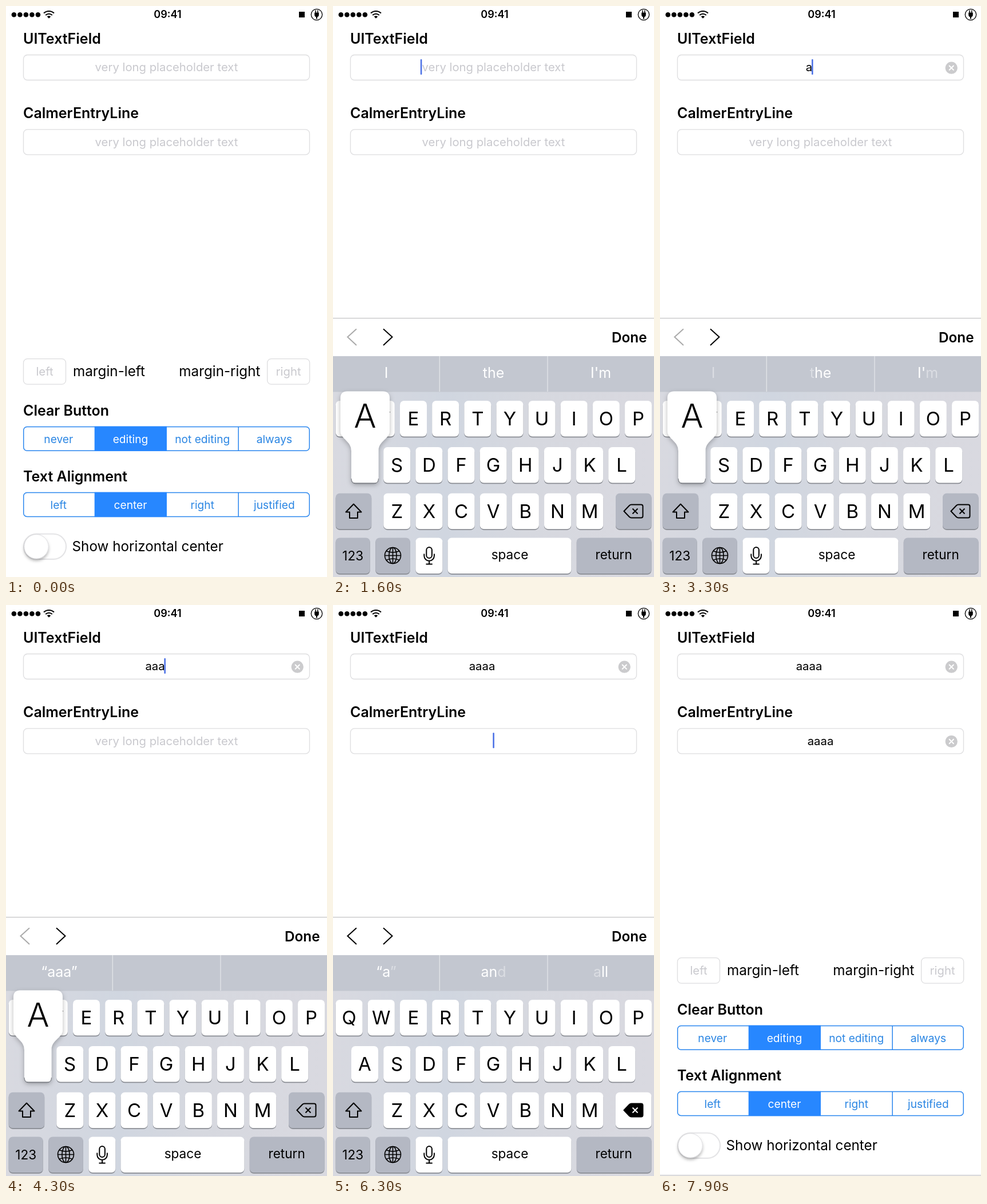
These frames come from a looping animation (561x998 px, 8 s). An HTML page:

```html
<!DOCTYPE html>
<html lang="en">
<head>
<meta charset="utf-8">
<title>Text field demo</title>
<style>
  html, body { margin: 0; width: 100%; height: 100%; overflow: hidden; background: #fff; }
  svg { display: block; width: 100%; height: 100%; font-family: Inter, Roboto, sans-serif; }
  text { white-space: pre; }
  .head { font-size: 25px; font-weight: 600; }
  .label { font-size: 24.25px; }
  .field { font-size: 20.3px; }
  .hint { fill: #c9c9ce; }
  .seg { font-size: 19.2px; fill: #2b86e3; }
  .on { fill: #fff; }
  .letter { font-size: 33px; }
  .word { font-size: 22.6px; }
  .suggest { font-size: 25px; fill: #fff; }
  .mid { text-anchor: middle; }
  .box { fill: #fff; stroke: #dddddf; stroke-width: 1.3; }
  .line { fill: none; stroke: #000; stroke-width: 2; }
</style>
</head>
<body>
<svg viewBox="0 0 561 998">
  <defs>
    <linearGradient id="tray">
      <stop offset="0" stop-color="#d8d9e0"/>
      <stop offset=".35" stop-color="#d0d6e0"/>
      <stop offset=".6" stop-color="#d6d8df"/>
      <stop offset="1" stop-color="#d9d9e0"/>
    </linearGradient>
    <filter id="soft" x="-40%" y="-40%" width="180%" height="180%">
      <feDropShadow dx="0" dy="3" stdDeviation="4" flood-opacity=".28"/>
    </filter>
    <filter id="lift" x="-40%" y="-40%" width="180%" height="180%">
      <feDropShadow dx="0" dy="3.5" stdDeviation="2.5" flood-opacity=".28"/>
    </filter>
    <g id="clear">
      <circle r="10.6" fill="#cbcbcd"/>
      <path d="M-4.2-4.2 4.2 4.2M4.2-4.2-4.2 4.2" stroke="#fff" stroke-width="2"/>
    </g>
  </defs>
  <rect width="561" height="998" fill="#fff"/>

  <g id="status">
    <path d="M66 12.5a13 13 0 0 1 18 0M69.2 16a8.3 8.3 0 0 1 11.6 0" class="line"/>
    <path d="M75 21.8 71.8 18.6a4.6 4.6 0 0 1 6.4 0z"/>
    <text x="282.5" y="21.4" class="mid" font-size="18.1" font-weight="600">09:41</text>
    <rect x="512" y="10" width="10" height="10"/>
    <circle cx="543" cy="15" r="9.7" class="line" style="stroke-width:1.3"/>
    <path d="M539.2 11.5h7.600v4q0 3-2.800 3.800v3.200h-2v-3.200q-2.800-.8-2.800-3.800zM540.500 7.500h1.500v5h-1.500zM544 7.500h1.500v5h-1.500z"/>
  </g>

  <g id="page"></g>
  <rect id="caret" width="2.6" height="27" rx="1" fill="#4d72e6"/>

  <g id="settings">
    <rect x="30.5" y="616.6" width="74" height="44.6" rx="7" class="box"/>
    <rect x="456.7" y="616.6" width="74" height="44.6" rx="7" class="box"/>
    <text x="67.5" y="645.5" class="field hint mid">left</text>
    <text x="493.7" y="645.5" class="field hint mid">right</text>
    <text x="117" y="647" class="label">margin-left</text>
    <text x="444.5" y="647" class="label" text-anchor="end">margin-right</text>
    <rect x="31" y="922.7" width="74.1" height="44.2" rx="22.1" fill="#fff" stroke="#e4e4e6" stroke-width="2.1"/>
    <circle cx="53" cy="944.8" r="21.2" fill="#fff" stroke="#d6d6da" stroke-width=".8" filter="url(#lift)"/>
    <text x="115.5" y="953.3" class="label">Show horizontal center</text>
  </g>
  <circle id="touch" cx="270.6" r="15.6" fill="#4a9fe0"/>

  <g id="keyboard">
    <rect y="545" width="561" height="68" fill="#fff"/>
    <rect y="545" width="561" height="1.3" fill="#c5c5c8"/>
    <path id="back" d="M41 564.5 25.5 578.5 41 593" class="line"/>
    <path d="M88 564.5 103.5 578.5 88 593" class="line"/>
    <text x="548.5" y="588" text-anchor="end" class="head" style="font-size:24.3px">Done</text>
    <rect y="674" width="561" height="330" fill="url(#tray)"/>
    <rect y="612" width="561" height="62.5" fill="#c3c7d0"/>
    <path d="M186.3 612v62M375 612v62" stroke="#e3e5e9" stroke-width="1.3"/>
    <g id="hints"></g>
    <g id="keys"></g>
    <path d="M36 870.5 49.5 884.5H43V895H29V884.5H22.5Z" class="line" stroke-linejoin="round"/>
    <path d="M508.5 883 518 873Q519.5 871.5 521.5 871.5H538.5Q541.5 871.5 541.5 874.5V891.5Q541.5 894.5 538.5 894.5H521.5Q519.5 894.5 518 893Z" class="line" id="eraseBody"/>
    <path d="M523.5 878.5l9 9m0-9l-9 9" class="line" id="eraseCross"/>
    <g class="line" style="stroke-width:1.6">
      <circle cx="104.5" cy="960.5" r="14"/>
      <ellipse cx="104.5" cy="960.5" rx="6.6" ry="14"/>
      <path d="M90.5 960.5h28M104.5 946.5v28M93 952.5q11.5 5 23 0M93 968.5q11.5-5 23 0"/>
    </g>
    <g class="line">
      <rect x="163.3" y="946" width="9.6" height="19" rx="4.8"/>
      <path d="M159.3 957.5v3.5a8.8 8.8 0 0 0 17.6 0v-3.5M168.1 970v5.5M162.5 975.5h11.2"/>
    </g>
    <g id="popup">
      <path filter="url(#soft)" fill="#fff" d="M25 673.5H87Q99 673.5 99 685.5V742C99 757 79.5 760 79.5 777V827Q79.5 834 72.5 834H39Q32 834 32 827V777C32 760 13 757 13 742V685.5Q13 673.5 25 673.5Z"/>
      <path d="M32 826q0 8 7 8h33.5q7 0 7-8" fill="none" stroke="#898c92" stroke-width="1.3"/>
      <text x="56" y="737" class="mid" font-size="58" font-weight="300">A</text>
    </g>
  </g>
</svg>

<script>
const NS = 'http://www.w3.org/2000/svg';
const $ = id => document.getElementById(id);

function add(parent, tag, attrs, content = '') {
  const node = document.createElementNS(NS, tag);
  for (const name in attrs) node.setAttribute(name, attrs[name]);
  node.textContent = content;
  parent.append(node);
  return node;
}
const write = (parent, x, y, cls, content) => add(parent, 'text', { x, y, class: cls }, content);
const show = (node, on) => node.setAttribute('visibility', on ? 'inherit' : 'hidden');

// Status dots
for (let i = 0; i < 5; i++) add($('status'), 'circle', { cx: 13.9 + i * 10.5, cy: 15.2, r: 4.3 });

// Text fields
const PLACEHOLDER = 'very long placeholder text';
function makeField(title, top, center) {
  const page = $('page');
  write(page, 30, top - 19, 'head', title);
  add(page, 'rect', { x: 30.5, y: top + .5, width: 500, height: 44, rx: 7, class: 'box' });
  return {
    top, center,
    hint: write(page, 280.5, top + 29.4, 'field hint mid', PLACEHOLDER),
    value: write(page, center, top + 29.4, 'field mid', ''),
    clear: add(page, 'use', { href: '#clear', x: 509.3, y: top + 23.2 })
  };
}
const fields = [makeField('UITextField', 85, 260.5), makeField('CalmerEntryLine', 215.3, 280.5)];

// Segmented controls
function makeSegments(title, top, names) {
  const box = $('settings');
  const height = 41.9, blue = '#2a86ee';
  write(box, 30, top - 19.6, 'head', title);
  add(box, 'rect', { x: 30.7, y: top, width: 499.6, height, rx: 6, fill: '#fff', stroke: blue, 'stroke-width': 1.5 });
  add(box, 'rect', { x: 154.7, y: top - .75, width: 126.3, height: height + 1.5, fill: '#2787ff' });
  add(box, 'path', { d: `M406.2 ${top}v${height}`, stroke: blue, 'stroke-width': 1.5 });
  names.forEach((name, i) => write(box, 91.8 + i * 125.7, top + 28.1, 'seg mid' + (i === 1 ? ' on' : ''), name));
}
makeSegments('Clear Button', 735.4, ['never', 'editing', 'not editing', 'always']);
makeSegments('Text Alignment', 850.5, ['left', 'center', 'right', 'justified']);

// Keyboard
const GREY = '#b4b8c3';
function makeKey(x, y, width, fill = '#fff') {
  add($('keys'), 'rect', { x, y: y + 1.7, width, height: 62.5, rx: 7, fill: '#898c93' });
  return add($('keys'), 'rect', { x, y, width, height: 62.5, rx: 7, fill });
}
[['QWERTYUIOP', 4.7, 690], ['ASDFGHJKL', 32, 771], ['ZXCVBNM', 88.3, 851.7]].forEach(([row, left, y]) => {
  [...row].forEach((letter, i) => {
    const x = left + i * 56.15;
    makeKey(x, y, 47);
    write($('keys'), x + 23.5, y + 43.3, 'letter mid', letter);
  });
});
makeKey(4.7, 851.7, 62.5, GREY);
const eraseKey = makeKey(494, 851.7, 62.5, GREY);
makeKey(4.7, 929.5, 60, GREY);
makeKey(74.3, 929.5, 60.5, GREY);
makeKey(144.4, 929.5, 47);
makeKey(200.5, 929.5, 216);
makeKey(425.8, 929.5, 130.7, GREY);
write($('keys'), 34.7, 969, 'word mid', '123');
write($('keys'), 309, 967, 'word mid', 'space');
write($('keys'), 490.7, 967, 'word mid', 'return');

// Suggestions: letters between tildes go first when a set fades out
const HINTS = { '': ['~I', '~t~he', "I'~m"], a: ['“a~”', 'an~d', '~a~ll'] };
const hintNodes = [93, 280.5, 468].map(x => write($('hints'), x, 650, 'suggest mid', ''));
function drawHints(text, fading) {
  const set = HINTS[text] || [`“${text}”`, '', ''];
  hintNodes.forEach((node, i) => {
    node.textContent = '';
    set[i].split('~').forEach((part, j) =>
      add(node, 'tspan', { 'fill-opacity': fading && j % 2 ? .4 : 1 }, part));
  });
}

// Timeline of state changes
const steps = [];
const at = (time, change) => steps.push({ time, change });
function edit(time, key, field, text, before) {
  at(time, { key });
  at(time + 100, { [field]: text, hint: before, fading: true });
  at(time + 200, { key: '', hint: text, fading: false });
}
const type = (time, field, text) => edit(time, 'A', field, text, text.slice(1));
const erase = (time, field) => edit(time, 'erase', field, '', 'a');

at(0, { 0: '', 1: '', focus: -1, key: '', hint: '', fading: false, back: '#aaa' });
at(800, { focus: 0 });
at(1500, { key: 'A' });
type(1600, 0, 'a');
erase(2000, 0);
type(2400, 0, 'a');
erase(2800, 0);
type(3200, 0, 'a');
type(3500, 0, 'aa');
type(3900, 0, 'aaa');
at(4200, { key: 'A' });
type(4300, 0, 'aaaa');
at(4700, { focus: -1 });
at(5500, { focus: 1, hint: '', back: '#000' });
type(6000, 1, 'a');
erase(6200, 1);
type(6500, 1, 'a');
type(6750, 1, 'aa');
type(7000, 1, 'aaa');
type(7250, 1, 'aaaa');
at(7500, { focus: -1 });

// Keyboard slides: start time and whether it ends up open
const slides = [[750, 1], [4750, 0], [5420, 1], [7520, 0]];
function hiddenPart(time) {
  const slide = slides.filter(s => s[0] <= time).pop();
  if (!slide) return 1;
  const k = (time - slide[0]) / 50;
  const rest = (1 + k) * Math.exp(-k);
  return slide[1] ? rest : 1 - rest;
}

const taps = [[600, 106.6], [5400, 236.6]];
function drawTouch(time) {
  const tap = taps.find(([start]) => time >= start && time < start + 300);
  show($('touch'), tap);
  if (!tap) return;
  $('touch').setAttribute('cy', tap[1]);
  $('touch').setAttribute('opacity', .62 * Math.min(1, (300 - time + tap[0]) / 200));
}

function drawFields(state) {
  fields.forEach((field, i) => {
    const text = state[i];
    field.value.textContent = text;
    show(field.clear, text);
    show(field.hint, !text && !(i === 1 && state.focus === 1));
  });
  const field = fields[state.focus];
  show($('caret'), field);
  if (!field) return;
  const text = state[state.focus];
  const x = !text && state.focus === 0 ? 154 : field.center + text.length * 5.7;
  $('caret').setAttribute('x', x - 1.2);
  $('caret').setAttribute('y', field.top + 8);
}

function draw(time) {
  const state = Object.assign({}, ...steps.filter(s => s.time <= time).map(s => s.change));
  const erasing = state.key === 'erase';
  drawFields(state);
  drawHints(state.hint, state.fading);
  drawTouch(time);
  show($('popup'), state.key === 'A');
  eraseKey.setAttribute('fill', erasing ? '#fff' : GREY);
  $('eraseBody').style.fill = erasing ? '#000' : 'none';
  $('eraseCross').style.stroke = erasing ? '#fff' : '#000';
  $('back').style.stroke = state.back;
  const hidden = hiddenPart(time);
  $('keyboard').setAttribute('transform', `translate(0 ${453 * hidden})`);
  show($('keyboard'), hidden < .9995);
}

const LOOP = 8000, TICK = 100;
const begin = performance.now();
let last = -1;
function frame() {
  const time = Math.floor((performance.now() - begin) % LOOP / TICK) * TICK;
  if (time !== last) draw(last = time);
  requestAnimationFrame(frame);
}
frame();
</script>
</body>
</html>
```
